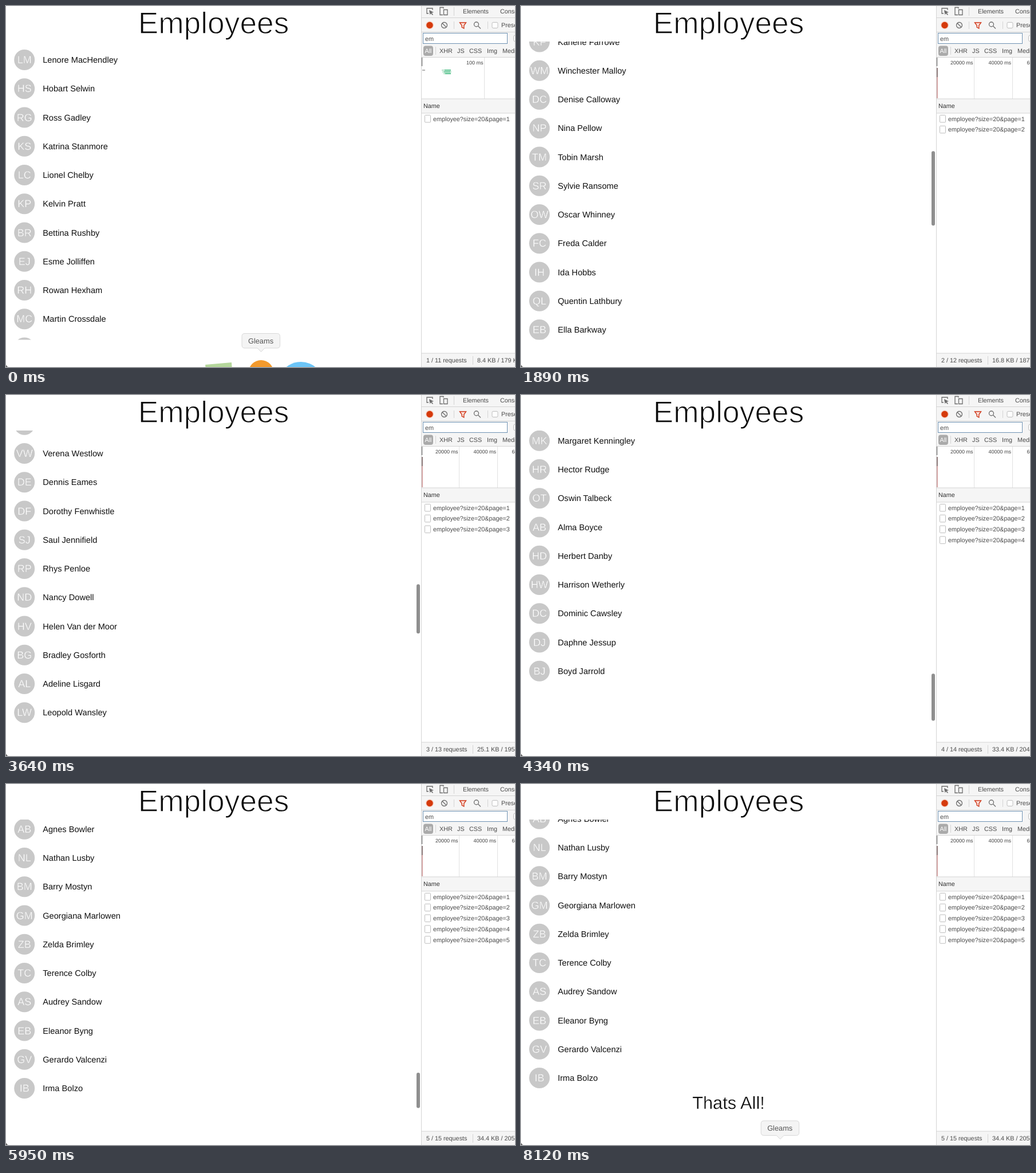
Recreate the animation shown at these times as an HTML page. Size 889x630 px, loop 8.19 s.

```html
<!DOCTYPE html>
<html lang="en">
<head>
<meta charset="utf-8">
<title>Employees</title>
<style>
  html, body { margin: 0; width: 100%; height: 100%; overflow: hidden; background: #fff; }
  svg { display: block; width: 889px; height: 630px; font-family: "Liberation Sans", Arial, sans-serif; text-rendering: geometricPrecision; }
  .tools { font-size: 10.8px; fill: #4a4a4a; }
  .small { font-size: 9px; fill: #444; text-anchor: end; }
  .line { stroke: #d4d4d4; fill: none; }
  .icon { stroke: #6e6e6e; fill: none; stroke-width: 1.3; }
  .box { stroke: #bdbdbd; fill: #fff; }
  .name { font-size: 14.64px; fill: #111; }
  .initials { font-size: 18px; fill: #fff; stroke: #c8c8c8; stroke-width: .4; text-anchor: middle; }
  .light { fill: #0c0c0c; stroke: #fff; text-anchor: middle; }
</style>
</head>
<body>
<svg viewBox="0 0 889 630">
  <defs><clipPath id="view"><rect y="62" width="725" height="520.5"/></clipPath></defs>
  <rect width="889" height="630" fill="#fff"/>
  <text class="light" x="362.5" y="48" font-size="53.3" stroke-width="1.3">Employees</text>

  <g clip-path="url(#view)">
    <g id="list">
      <text id="end" class="light" x="362.5" y="4117.75" font-size="30.8" stroke-width=".4">Thats All!</text>
    </g>
  </g>
  <rect id="thumb" x="717" width="6" rx="3" fill="#8f8f8f"/>

  <!-- network panel -->
  <g class="tools">
    <path d="M726 0H889V89H726ZM726 162H889V187H726ZM726 606H889V630H726Z" fill="#f5f5f5"/>
    <path class="line" d="M725.5 0V630M726 20.5H889M726 45.5H889M726 89.5H889M726 162H889M726 187H889M726 606H889
      M782.5 2V17M782.5 27V40M841.5 27V40M750.5 71V85M815.5 611V626"/>
    <path class="icon" d="M738 13H735V4H745V7M764 4.500V2.500H758V15.500H763M764.500 6.500H771V15.500H764.500Z"/>
    <path d="M739 7L747 11L743.500 12L746 15L745 16L742 13L740.500 15.500Z" fill="#6e6e6e"/>
    <text x="798" y="12.500">Elements</text><text x="863" y="12.500">Console</text>
    <circle cx="740" cy="33.500" r="7" fill="#f7d3c8"/><circle cx="740" cy="33.500" r="5.700" fill="#d53a0c"/>
    <circle class="icon" cx="765.500" cy="33.500" r="5"/><path class="icon" d="M762 30L769 37"/>
    <path d="M792.500 29H803.500L799.800 34V39L796.200 37V34Z" fill="#fbe3dd" stroke="#d0391b" stroke-width="1.400"/>
    <circle class="icon" cx="821.500" cy="32" r="4"/><path class="icon" d="M824.500 35L829 39.500" stroke-width="2"/>
    <rect class="box" x="849" y="28.500" width="10" height="10" rx="2"/>
    <text x="865" y="37">Preserve log</text>
    <rect x="728.500" y="47.500" width="147" height="18" fill="#fff" stroke="#6f93b3"/>
    <text x="732" y="61">em</text>
    <rect class="box" x="886.500" y="51.500" width="10" height="10" rx="2"/>
    <rect x="729" y="69.500" width="17" height="17.500" rx="4" fill="#aaa"/>
    <text x="731.500" y="82" fill="#fff">All</text>
    <text x="757" y="82">XHR</text><text x="788" y="82">JS</text><text x="809" y="82">CSS</text>
    <text x="840" y="82">Img</text><text x="867" y="82">Media</text>
    <path d="M726.500 90V105" stroke="#999" stroke-width="2"/>
    <g id="early">
      <path class="line" d="M835.500 90V162" stroke-opacity=".7"/>
      <text class="small" x="833.500" y="101.500">100 ms</text>
      <path d="M727 112H732" stroke="#8b8b8b" stroke-width="1.300"/>
      <path d="M761 112H777M762 115H778M764 118H777" stroke="#9bd8b5" stroke-width="1.500"/>
      <path d="M766 112H777M765 115H776M767 118H777" stroke="#36b779" stroke-width="1.300"/>
    </g>
    <g id="late">
      <path class="line" d="M791.500 90V162M858.500 90V162" stroke-opacity=".7"/>
      <text class="small" x="789.500" y="101.500">20000 ms</text>
      <text class="small" x="856" y="101.500">40000 ms</text>
      <text class="small" x="923" y="101.500">60000 ms</text>
      <path d="M727 108V161" stroke="#b96a6a" stroke-width="1.200"/>
      <path d="M727 108V124" stroke="#666" stroke-width="1.200"/>
    </g>
    <text x="729" y="178" fill="#333">Name</text>
    <g id="requests"></g>
    <text id="count" x="734" y="622"></text>
    <text id="bytes" x="823" y="622"></text>
  </g>

  <g id="dock">
    <g id="apps">
      <rect x="350" y="624" width="46" height="46" fill="#b5d79c" transform="rotate(-5 373 647)"/>
      <circle cx="445.500" cy="640" r="22" fill="#f39a2d"/>
      <circle cx="515" cy="661" r="40" fill="#6cc5f7"/>
    </g>
    <path d="M417 571.500H473.500Q478.500 571.500 478.500 576.500V592Q478.500 597 473.500 597H452L445.500 603.500L439 597H417Q412 597 412 592V576.500Q412 571.500 417 571.500Z" fill="#f4f4f4" stroke="#d8d8d8"/>
    <text x="445" y="588.500" font-size="12.800" fill="#555" text-anchor="middle">Gleams</text>
  </g>
  <path d="M0 626Q1 629 4 630H0Z" fill="#555"/>
</svg>
<script>
const LOOP = 8190, STEP = 70, PITCH = 50.25, VIEW = 521;
const names = `Lenore MacHendley,Hobart Selwin,Ross Gadley,Katrina Stanmore,Lionel Chelby,Kelvin Pratt,Bettina Rushby,Esme Jolliffen,Rowan Hexham,Martin Crossdale,
Aurelianno Gantley,Gustav Lornby,Anna Wexcombe,Basil Huddle,Karlene Farrowe,Winchester Malloy,Denise Calloway,Nina Pellow,Tobin Marsh,Sylvie Ransome,
Oscar Whinney,Freda Calder,Ida Hobbs,Quentin Lathbury,Ella Barkway,Matthew Sorrelby,Edmund Hollin,Jerome Burdock,Walter Ridgen,Annabel Ormwood,
Molly Dunstow,Verena Westlow,Dennis Eames,Dorothy Fenwhistle,Saul Jennifield,Rhys Penloe,Nancy Dowell,Helen Van der Moor,Bradley Gosforth,Adeline Lisgard,
Leopold Wansley,Clara Nethercot,Simon Peverill,Judith Amblecote,Felix Dorning,Paula Trevick,Conrad Hulme,Wendy Larkham,Ivor Statham,Tessa Copley,
Ralph Minton,Margaret Kenningley,Hector Rudge,Oswin Talbeck,Alma Boyce,Herbert Danby,Harrison Wetherly,Dominic Cawsley,Daphne Jessup,Boyd Jarrold,
Celia Norrey,Victor Ashdene,Phoebe Garrick,Stuart Wenlow,Lydia Thorpe,Owen Fallow,Miriam Castell,Rupert Elsden,Joan Pickersley,Neil Harbury,
Agnes Bowler,Nathan Lusby,Barry Mostyn,Georgiana Marlowen,Zelda Brimley,Terence Colby,Audrey Sandow,Eleanor Byng,Gerardo Valcenzi,Irma Bolzo`.split(/,\s*/);

// [time, scroll offset]
const scrollKeys = [[1050, 0], [1120, 22], [1400, 343.75], [1540, 510], [1680, 620], [1890, 735],
  [2450, 1111.8], [2730, 1290], [3220, 1515], [3360, 1549.75], [3640, 1549.75], [3850, 2150], [4060, 2517],
  [4200, 2517], [4340, 2577], [4480, 2640], [4900, 3110], [5390, 3480], [5670, 3480], [5810, 3520],
  [5950, 3532.75], [6090, 3562], [6230, 3562], [6300, 3550.75]];
// [time, rows, extra height below the rows]
const contentKeys = [[0, 20, 0], [1540, 20, 140], [1750, 40, 0], [3290, 40, 140], [3640, 60, 0],
  [4270, 60, 140], [4480, 80, 0], [5810, 80, 140], [6300, 80, 29]];
// [time, transferred, total]
const requestKeys = [[0, '8.4', 179], [1540, '16.8', 187], [3290, '25.1', 195], [4270, '33.4', 204], [5880, '34.4', 205]];

const $ = id => document.getElementById(id);
const show = (el, on) => { el.style.display = on ? '' : 'none'; };

function add(parent, tag, attrs, text = '') {
  const el = document.createElementNS('http://www.w3.org/2000/svg', tag);
  for (const key in attrs) el.setAttribute(key, attrs[key]);
  el.textContent = text;
  return parent.appendChild(el);
}

const rows = names.map((name, i) => {
  const y = 94 + i * PITCH, g = add($('list'), 'g', {});
  const [first, last] = name.split(' ');
  add(g, 'circle', { cx: 32.2, cy: y, r: 18, fill: '#c8c8c8' });
  add(g, 'text', { class: 'initials', x: 32.2, y: y + 6.2 }, first[0] + last[0]);
  add(g, 'text', { class: 'name', x: 64.2, y: y + 5.1 }, name);
  return g;
});

const requests = requestKeys.map((_, i) => {
  const y = 190.5 + i * 18.8, g = add($('requests'), 'g', {});
  add(g, 'rect', { class: 'box', x: 731.5, y, width: 10, height: 12.5, rx: 1 });
  add(g, 'text', { x: 746, y: y + 10 }, `employee?size=20&page=${i + 1}`);
  return g;
});

const lastKey = (keys, t) => keys.filter(k => k[0] <= t).length - 1;

function scrollAt(t) {
  const i = lastKey(scrollKeys, t);
  if (i < 0) return 0;
  const [t0, a] = scrollKeys[i], next = scrollKeys[i + 1];
  return next ? a + (next[1] - a) * (t - t0) / (next[0] - t0) : a;
}

function drawDock(t) {
  let x = 0, y = 80;
  if (t < 700) y = 75 * (t / 700) ** 1.5;
  else if (t >= 8120) { x = 7.2; y = 16.3; }
  else if (t >= 8050) { x = 1; y = 35; }
  $('dock').setAttribute('transform', `translate(${x} ${y})`);
}

function draw(t) {
  const scroll = scrollAt(t);
  const [, count, extra] = contentKeys[lastKey(contentKeys, t)];
  const height = count * PITCH + 23 + extra;
  $('list').setAttribute('transform', `translate(0 ${-scroll})`);
  rows.forEach((row, i) => show(row, i < count));
  show($('end'), t >= 6300);

  const thumb = $('thumb');
  thumb.setAttribute('y', 65.5 + 519 * scroll / height);
  thumb.setAttribute('height', 519 * VIEW / height - 3);
  thumb.setAttribute('opacity', t < 1120 ? 0 : Math.max(0, Math.min(1, (7280 - t) / 280)));

  const n = lastKey(requestKeys, t), [, sent, total] = requestKeys[n];
  requests.forEach((r, i) => show(r, i <= n));
  show($('early'), n === 0);
  show($('late'), n > 0);
  $('count').textContent = `${n + 1} / ${n + 11} requests`;
  $('bytes').textContent = `${sent} KB / ${total} KB`;
  drawDock(t);
}

const start = performance.now();
function tick() {
  const t = (performance.now() - start) % LOOP;
  draw(Math.floor(t / STEP) * STEP);
  requestAnimationFrame(tick);
}
tick();
</script>
</body>
</html>
```
